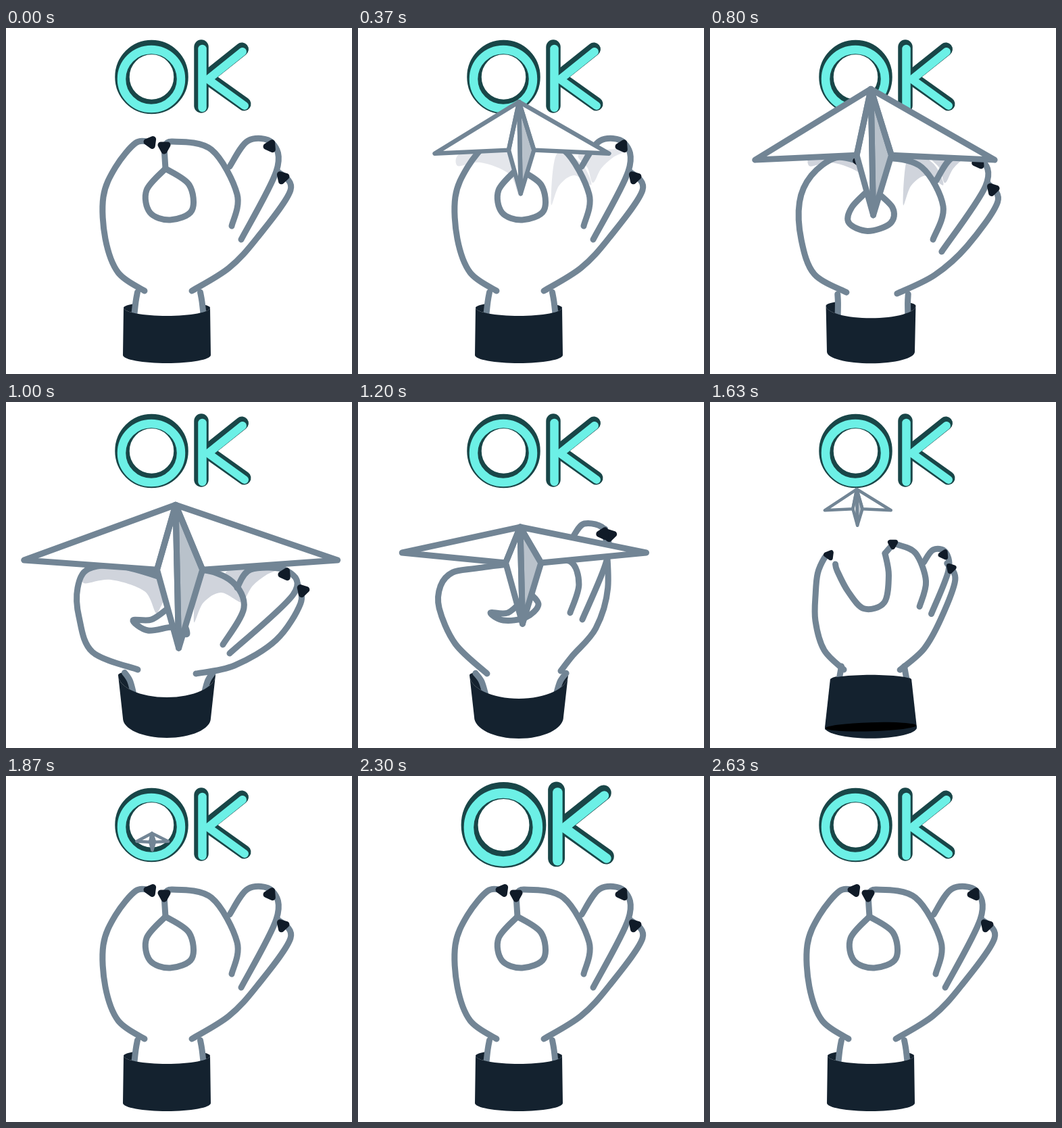
These frames come from a looping animation (512 by 512 pixels, 2.93 s). An HTML page with a canvas:

```html
<!DOCTYPE html>
<html lang="en">
<head>
<meta charset="utf-8">
<title>OK</title>
<style>
html, body { margin: 0; width: 100%; height: 100%; overflow: hidden; background: #fff; }
canvas { display: block; width: 512px; height: 512px; }
</style>
</head>
<body>
<canvas id="stage" width="512" height="512"></canvas>
<script>
const ctx = document.getElementById('stage').getContext('2d');
const LOOP = 2930, LAUNCH = 800, AXIS = 238;
const INK = '#728595', NAVY = '#14222f', NAIL = '#101b28', SHADE = '#d0d4dc',
      FOLD = '#b9c2cb', TEAL = '#6cf0e6', DEEP = '#194648';

// Key points of each line as x, y; cuff: top half, top y, sag, bottom half, bottom y, bulge
const rest = {
  thumb: [205,389, 166,362, 147,312, 144,250, 162,206, 192,170, 213,169],
  ring: [236,208, 208,240, 213,273, 243,284, 275,270, 271,232, 236,208],
  index: [234,177, 246,168, 304,180, 342,246, 334,293],
  middle: [331,205, 358,167, 394,170, 400,212, 348,313],
  pinky: [402,212, 421,240, 372,310, 330,355, 275,389],
  cuff: [64, 414, 12, 65, 484, 12]
};
const crouch = {
  thumb: [195,396, 128,370, 108,318, 106,275, 122,247, 170,243, 238,262],
  ring: [240,305, 215,322, 188,323, 210,338, 248,333, 268,343, 256,310],
  index: [256,268, 290,249, 335,266, 352,305, 321,359],
  middle: [342,275, 362,248, 416,250, 425,285, 331,372],
  pinky: [432,270, 436,298, 400,352, 338,390, 281,402],
  cuff: [72, 404, 33, 65, 468, 29]
};
const toss = {
  thumb: [191,402, 144,358, 120,305, 122,272, 140,252, 175,246, 238,238],
  ring: [245,292, 222,312, 196,312, 215,323, 248,319, 267,300, 252,281],
  index: [244,232, 270,236, 314,236, 327,270, 314,312],
  middle: [318,200, 335,180, 366,190, 368,235, 332,322],
  pinky: [366,188, 370,275, 352,335, 318,375, 300,398],
  cuff: [73, 404, 35, 66, 466, 32]
};
const open = {
  thumb: [192,402, 168,370, 158,330, 161,305, 155,288, 153,278, 156,270],
  ring: [156,270, 178,265, 197,290, 215,324, 244,319, 260,280, 275,243],
  index: [294,238, 300,246, 306,258, 304,280, 293,311],
  middle: [306,256, 310,252, 317,256, 320,276, 313,315],
  pinky: [315,252, 321,282, 321,330, 307,374, 288,402],
  cuff: [59, 408, -16, 70, 478, 21]
};
const HAND_TIMES = [LAUNCH, 1000, 1200, 1430, 1830];

// Plane: nose x, nose y, half span, wing drop, keel drop
const PLANE_TIMES = [LAUNCH, 1000, 1200, 1430, 1870, 1960];
const FLIGHT = [
  [238, 90, 177, 105, 98], [251, 152, 232, 82, 96], [240, 185, 181, 38, 53],
  [221, 164, 80, 43, 41], [216, 85, 23.5, 12, 13], [216, 76, 0, 0, 0]
];

// Shade under the wings while crouching
const SHADOWS = [
  [115,268, 155,263, 205,280, 224,312, 234,250, 128,247],
  [278,325, 292,297, 318,282, 348,296, 330,264, 288,250],
  [351,293, 365,272, 385,256, 410,243, 328,250, 342,272]
];

const clamp = v => Math.max(0, Math.min(1, v));
const smooth = v => v * v * (3 - 2 * v);
const mix = (a, b, u) => a.map((v, i) => v + (b[i] - v) * u);

// Cubic interpolation through timed poses
function sample(times, poses, t) {
  const last = times.length - 1;
  if (t <= times[0]) return poses[0];
  if (t >= times[last]) return poses[last];
  let i = 0;
  while (t > times[i + 1]) i++;
  const slope = (k, n) => {
    const a = Math.max(0, k - 1), b = Math.min(last, k + 1);
    return (poses[b][n] - poses[a][n]) / (times[b] - times[a]);
  };
  const span = times[i + 1] - times[i], u = (t - times[i]) / span;
  const m0 = u * (1 - u) ** 2 * span, m1 = u * u * (u - 1) * span;
  return mix(poses[i], poses[i + 1], smooth(u))
    .map((v, n) => v + slope(i, n) * m0 + slope(i + 1, n) * m1);
}

function handPart(name, t) {
  if (t < LAUNCH) return rest[name];
  const windUp = mix(rest[name], crouch[name], .3);
  const poses = [windUp, crouch[name], toss[name], open[name], rest[name]];
  return sample(HAND_TIMES, poses, t);
}

function curve(flat, closed) {
  const n = flat.length / 2;
  const at = i => {
    const k = closed ? (i + n) % n : Math.max(0, Math.min(n - 1, i));
    return [flat[2 * k], flat[2 * k + 1]];
  };
  ctx.beginPath();
  ctx.moveTo(...at(0));
  for (let i = 0; i < (closed ? n : n - 1); i++) {
    const [a, b, c, d] = [at(i - 1), at(i), at(i + 1), at(i + 2)];
    ctx.bezierCurveTo(b[0] + (c[0] - a[0]) / 6, b[1] + (c[1] - a[1]) / 6,
      c[0] - (d[0] - b[0]) / 6, c[1] - (d[1] - b[1]) / 6, c[0], c[1]);
  }
}

function poly(points, closed = true) {
  ctx.beginPath();
  points.forEach(p => ctx.lineTo(...p));
  if (closed) ctx.closePath();
}

function fill(color) { ctx.fillStyle = color; ctx.fill(); }

function stroke(color, width) {
  ctx.strokeStyle = color;
  ctx.lineWidth = width;
  ctx.stroke();
}

function oval(x, y, rx, ry, turn = 0) {
  ctx.beginPath();
  ctx.ellipse(x, y, rx, ry, turn, 0, Math.PI * 2);
}

function halfArc(y, rx, ry) {
  return Array.from({ length: 33 }, (_, i) => {
    const a = Math.PI * i / 32;
    return [AXIS + rx * Math.cos(a), y + ry * Math.sin(a)];
  });
}

function drawWrist([half, y, sag]) {
  poly([...halfArc(y, half, Math.max(0, sag)), ...halfArc(y, half, -9).reverse()]);
  fill(NAVY);
  const flare = Math.max(0, sag - 12) * .9;
  const side = dir => {
    const x = AXIS + 3;
    return [x + dir * (46.5 + flare), 391 + flare * .5,
            x + dir * (49 + flare * .45), 405 + flare * .4,
            x + dir * 52, y + 12 + sag * .5];
  };
  const [l, r] = [side(-1), side(1)];
  poly([[l[0] + 6, l[1] - 20], [l[0], l[1]], [l[2], l[3]], [l[4], l[5]], [AXIS, y + sag + 4],
        [r[4], r[5]], [r[2], r[3]], [r[0], r[1]], [r[0] - 6, r[1] - 20]]);
  fill('#fff');
  for (const line of [l, r]) { curve(line); stroke(INK, 9); }
}

function drawCuff([half, y, sag, baseHalf, baseY, bulge]) {
  poly([...halfArc(y, half, sag).reverse(), ...halfArc(baseY, baseHalf, bulge)]);
  fill(NAVY);
  const tilt = clamp(-sag / 16);
  if (tilt === 0) return;
  oval(AXIS, baseY, baseHalf, bulge * tilt, -.03);
  fill(NAVY);
  oval(AXIS, baseY - 1, baseHalf - 1, (bulge - 1.5) * tilt, -.03);
  fill('#000');
}

function nail(x, y, turn, size) {
  ctx.save();
  ctx.translate(x, y);
  ctx.rotate(turn);
  ctx.scale(size, size);
  poly([[-5, -4], [5, -4], [0, 5]]);
  fill(NAIL);
  stroke(NAIL, 9);
  ctx.restore();
}

function drawShadows(t) {
  const alpha = t < LAUNCH ? clamp((t - 200) / 300) : clamp((1130 - t) / 100);
  const u = clamp((t - LAUNCH) / 200);
  ctx.save();
  ctx.globalAlpha = alpha;
  ctx.translate(330, -64 * (1 - u));
  ctx.scale(.85 + .15 * u, 1);
  ctx.translate(-330, 0);
  for (const shape of SHADOWS) { curve(shape, true); fill(SHADE); }
  ctx.restore();
}

function drawHand(t) {
  const [thumb, ring, index, middle, pinky, cuff] =
    ['thumb', 'ring', 'index', 'middle', 'pinky', 'cuff'].map(name => handPart(name, t));
  drawWrist(cuff);
  drawShadows(t);
  const stem = [...ring.slice(-2), ...index.slice(0, 2)];
  for (const line of [thumb, ring, stem, index, middle, pinky]) {
    curve(line);
    stroke(INK, 9);
  }
  drawCuff(cuff);
  const size = 1 - .45 * clamp(-cuff[2] / 16);
  nail(...thumb.slice(-2), 1.7, size);
  nail(index[0], index[1], 0, size);
  nail(pinky[0] + 7 * size, pinky[1] + 10 * size, .3, size);
  nail(middle[4] - 4 * size, middle[5] + 5 * size, 1.5, size);
}

function drawPlane(t) {
  if (t < 200 || t >= 1960) return;
  const [x, y, half, drop, keelDrop] = sample(PLANE_TIMES, FLIGHT, t);
  const lean = half * .033, keel = half * .145;
  const nose = [x, y], tail = [x + lean * .6, y + keelDrop + half * .5];
  const wing = dir => [x + lean + dir * half, y + drop];
  const fold = dir => [x + lean * .8 + dir * keel, y + keelDrop];
  const width = Math.min(9, Math.max(4.5, half * .05), half * .2);
  const faces = [
    [nose, wing(-1), fold(-1)], [nose, wing(1), fold(1)],
    [nose, fold(-1), tail], [nose, fold(1), tail]
  ];
  ctx.save();
  if (t < LAUNCH) {
    const grow = .86 * (1 - (1 - clamp((t - 170) / 330)) ** 2);
    ctx.translate(239, 185);
    ctx.scale(grow, grow);
    ctx.translate(-239, -194);
  }
  faces.forEach((face, i) => { poly(face); fill(i === 3 ? FOLD : '#fff'); });
  faces.forEach(face => { poly(face); stroke(INK, width); });
  ctx.restore();
}

function scaled(x, y, s, shift, draw) {
  ctx.save();
  ctx.translate(x + shift, y);
  ctx.scale(s, s);
  ctx.translate(-x, -y);
  draw();
  ctx.restore();
}

function letterK(stem, arms, color, stemWidth, armWidth) {
  poly(stem, false); stroke(color, stemWidth);
  poly(arms, false); stroke(color, armWidth);
}

function drawWord(t) {
  const swell = smooth(clamp(1 - Math.abs(t - 2375) / 255));
  const s = 1 + .2 * swell;
  scaled(215.5, 72.5, s, 0, () => {
    oval(215.5, 72.5, 43.5, 44); stroke(DEEP, 21.5);
    oval(215, 75.5, 44, 43.5); stroke(TEAL, 12.5);
  });
  scaled(320, 72, s, 12 * swell, () => {
    letterK([[289, 28], [289, 115]], [[349, 31.5], [297, 73], [352.5, 112.5]], DEEP, 21.5, 20);
    letterK([[290.5, 31], [290.5, 118]], [[350, 35], [299, 76], [353, 115]], TEAL, 12.5, 12);
  });
}

function frame(now) {
  const t = now % LOOP;
  ctx.fillStyle = '#fff';
  ctx.fillRect(0, 0, 512, 512);
  ctx.lineCap = ctx.lineJoin = 'round';
  drawWord(t);
  drawHand(t);
  drawPlane(t);
}

const start = performance.now();
function tick() {
  frame(performance.now() - start);
  requestAnimationFrame(tick);
}
tick();
</script>
</body>
</html>
```
